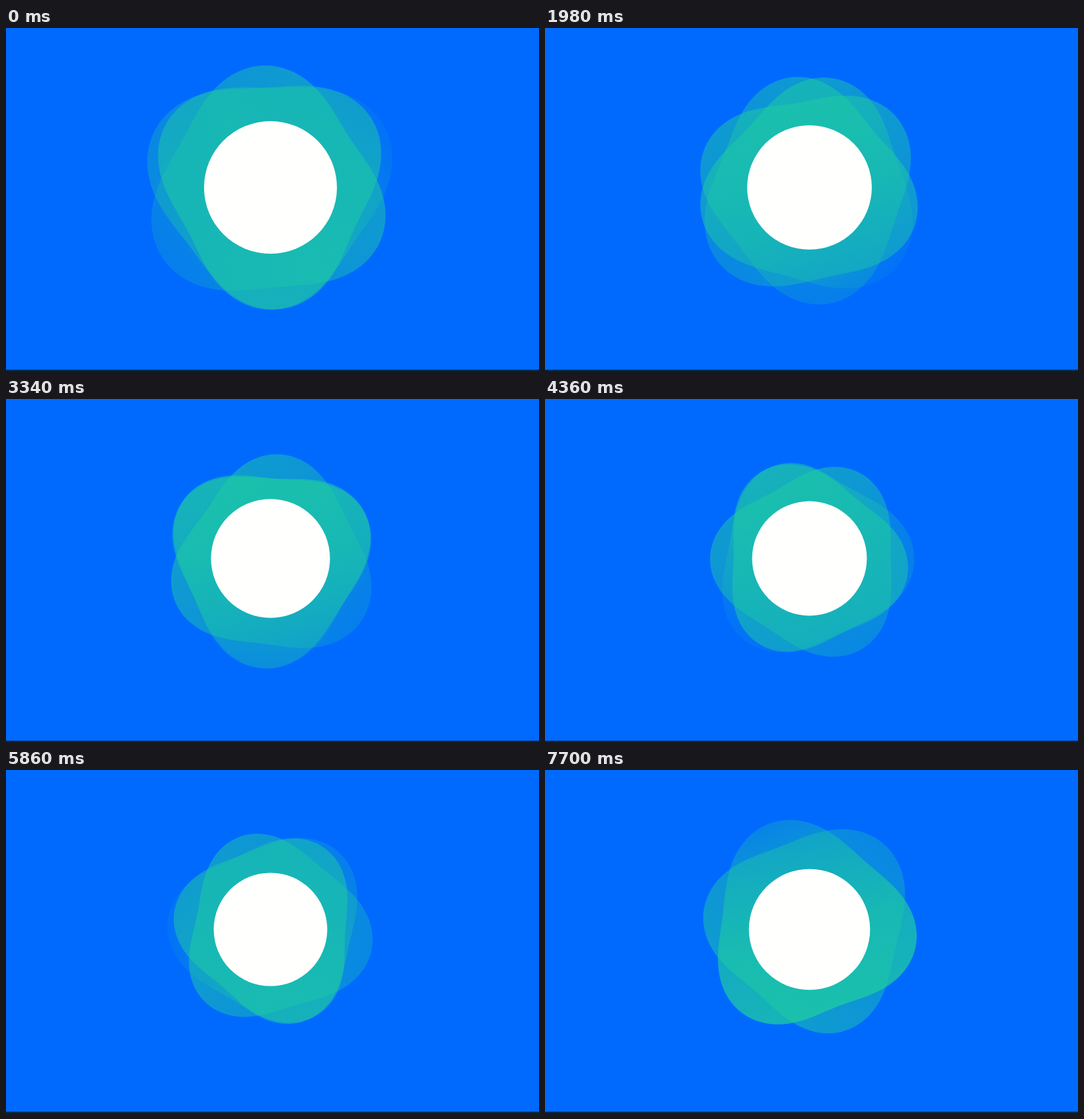
Recreate the animation shown at these times as an HTML page with a canvas. Size 794 by 512 pixels, loop 7720 ms.

```html
<!DOCTYPE html>
<html lang="en">
<head>
<meta charset="utf-8">
<title>Pulsing blobs</title>
<style>
  html, body { margin: 0; width: 100%; height: 100%; overflow: hidden; background: #006aff; }
  canvas { display: block; }
</style>
</head>
<body>
<canvas id="stage" width="794" height="512"></canvas>
<script>
const ctx = document.getElementById('stage').getContext('2d');
const LOOP = 7.72, TURN = 2 * Math.PI, RAD = Math.PI / 180;

// Angle of the flat side in degrees, turn rate per second, opacity at the long lobe.
const blobs = [
  { angle: -33, speed: -33.5, fade: .2 },
  { angle: 25, speed: -33, fade: .3 },
  { angle: 152, speed: 36, fade: .08 }
];

const teal = alpha => `rgba(30,205,160,${alpha})`;

// Three lobes: a flat side towards +x and the longest lobe towards -x.
const lobeRadius = a => 1 - .12 * Math.cos(3 * a) - .04 * Math.cos(a);

function drawBlob({ angle, speed, fade }, t, size) {
  const fill = ctx.createLinearGradient(-1.16 * size, 0, .84 * size, 0);
  fill.addColorStop(0, teal(fade));
  fill.addColorStop(.6, teal(.42));
  fill.addColorStop(1, teal(.5));

  ctx.save();
  ctx.rotate((angle + speed * t) * RAD);
  ctx.beginPath();
  for (let a = 0; a < TURN; a += TURN / 180) {
    const r = size * lobeRadius(a);
    ctx.lineTo(r * Math.cos(a), r * Math.sin(a));
  }
  ctx.fillStyle = fill;
  ctx.fill();
  ctx.restore();
}

function draw(t) {
  const disc = 82.7 + 3.1 * Math.abs(t - 5.26);
  const size = 2.3 * disc - 62;

  ctx.fillStyle = '#006aff';
  ctx.fillRect(0, 0, 794, 512);
  ctx.fillStyle = '#052d55';
  ctx.fillRect(0, 510, 794, 2);

  ctx.save();
  ctx.translate(394, 238);
  blobs.forEach(blob => drawBlob(blob, t, size));
  ctx.fillStyle = '#fffffd';
  ctx.beginPath();
  ctx.arc(0, 0, disc, 0, TURN);
  ctx.fill();
  ctx.restore();
}

const start = performance.now();
function tick() {
  draw((performance.now() - start) / 1000 % LOOP);
  requestAnimationFrame(tick);
}
tick();
</script>
</body>
</html>
```
